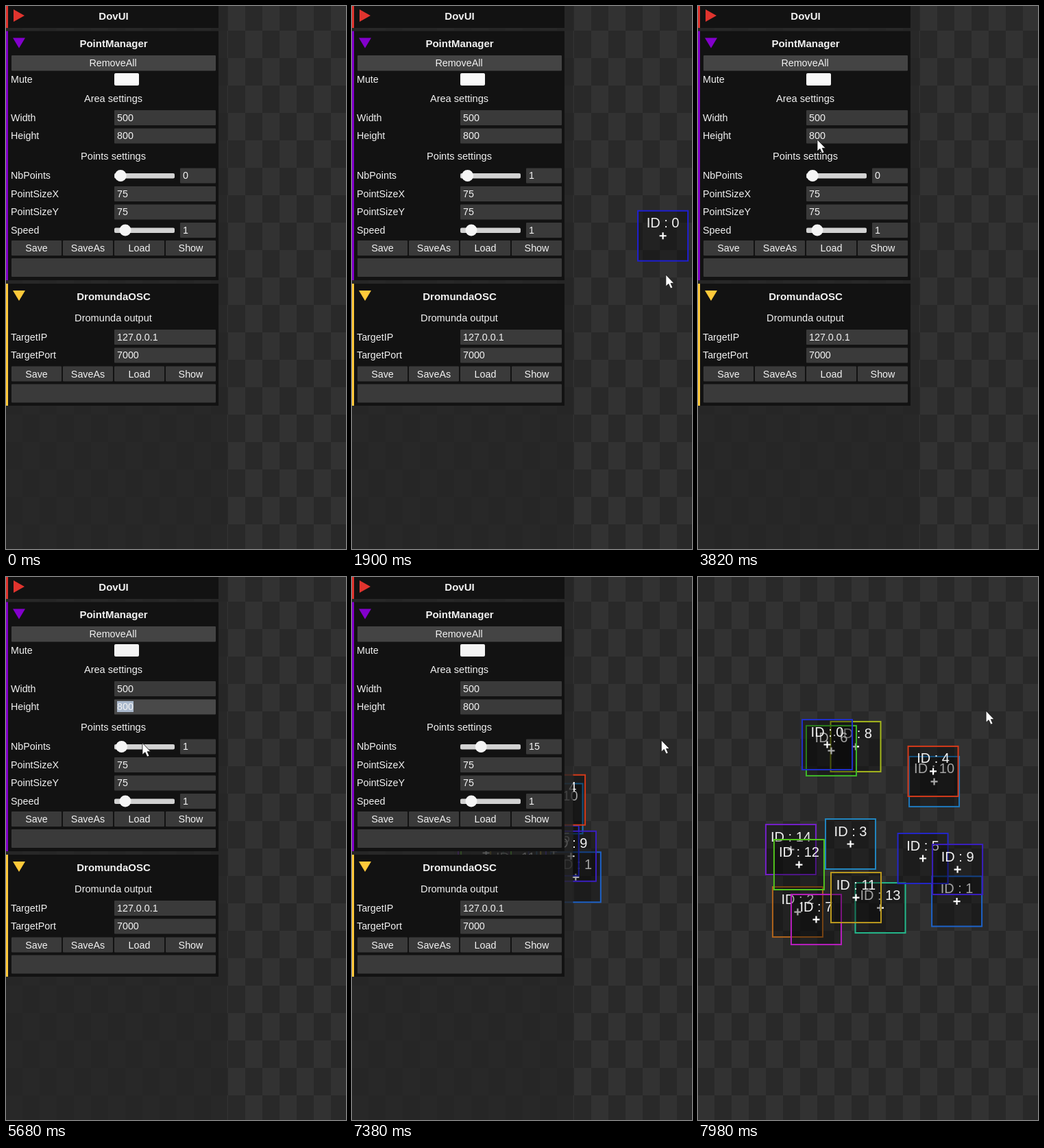
An HTML page that plays this animation: 496 px wide and 792 px high, repeating every 8000 ms.

```html
<!DOCTYPE html>
<html lang="en">
<head>
<meta charset="utf-8">
<title>Point panel</title>
<style>
html, body { margin: 0; width: 100%; height: 100%; overflow: hidden; background: #292929; }
svg { display: block; width: 496px; height: 792px; font-family: "Liberation Sans", Arial, sans-serif; }
text { fill: #f2f2f2; font-size: 14.3px; white-space: pre; }
</style>
</head>
<body>
<svg id="stage" viewBox="0 0 496 792" xmlns="http://www.w3.org/2000/svg"></svg>
<script>
const LOOP = 8000;
const NS = "http://www.w3.org/2000/svg";
const stage = document.getElementById("stage");

function add(parent, tag, attrs, content) {
  const el = document.createElementNS(NS, tag);
  for (const key in attrs) el.setAttribute(key, attrs[key]);
  if (content !== undefined) el.textContent = content;
  parent.appendChild(el);
  return el;
}
const rect = (p, x, y, width, height, fill, more) =>
  add(p, "rect", { x, y, width, height, fill, ...more });
const label = (p, x, y, str, more) => add(p, "text", { x, y, ...more }, str);
const centered = (p, x, y, str, more) => label(p, x, y, str, { "text-anchor": "middle", ...more });
const show = (el, on) => el.setAttribute("display", on ? "inline" : "none");
const move = (el, [x, y]) => el.setAttribute("transform", `translate(${x.toFixed(2)} ${y.toFixed(2)})`);

// Checkerboard
const board = add(stage, "g", { "shape-rendering": "crispEdges" });
rect(board, 0, 0, 496, 792, "#292929");
for (let row = 0; row < 20; row++)
  for (let col = 0; col < 20; col++)
    if ((row + col) % 2) rect(board, col * 25 - 1, row * 40 - 4, 25, 40, "#323232");

// Tracked points
const pointLayer = add(stage, "g", {});
function makePoint(id, color) {
  const g = add(pointLayer, "g", { display: "none" });
  rect(g, -36.5, -36.5, 73, 73, "#000", { "fill-opacity": .33, stroke: color, "stroke-width": 2 });
  centered(g, 0, -12, "ID : " + id, { style: "font-size:20px" });
  add(g, "path", { d: "M-5 0H5M0-5V5", stroke: "#fff", "stroke-width": 2.2 });
  return g;
}

// id, final x, final y, colour; listed from back to front
const swarm = [
  [14, 135.5, 397.5, "#7420c8"], [2, 145.5, 488.5, "#b0641c"],
  [10, 344.5, 298.5, "#1e78bc"], [13, 266, 482.5, "#24b98c"],
  [8, 230, 247.5, "#a6b81c"], [6, 194.5, 253.5, "#3fb92a"],
  [1, 377.5, 473, "#1d62c8"], [5, 328, 410.5, "#2326c8"],
  [9, 378.5, 426.5, "#3a1fc0"], [3, 222.5, 389.5, "#2185bf"],
  [0, 188.5, 244.5, "#1f2fc8"], [4, 343, 283.5, "#d43a1a"],
  [7, 172.5, 499.5, "#b91fc0"], [11, 230.5, 467.5, "#bc9a1e"],
  [12, 147.5, 419.5, "#52c41e"]
].map(([id, x, y, color]) => ({
  x, y,
  born: id ? 6440 + 24 * id : 4500,
  from: id ? [248, 384] : [187, 190],
  el: makePoint(id, color)
}));
const dragged = makePoint(0, "#1f1fd0");

// Control panel
const panel = add(stage, "g", {});
rect(panel, 0, 0, 322.5, 792, "#262626", { "fill-opacity": .78 });

const FIELD = "#3a3a3a";
const field = (x, y, w, h = 22) => rect(panel, x, y, w, h, FIELD, { rx: 1 });

function section(y, h, color, title, open) {
  rect(panel, 0, y, 310, h, "#121212");
  rect(panel, 0, y, 3, h, color);
  const d = open ? `M10 ${y + 10}H28L19 ${y + 25}Z` : `M11 ${y + 5}L27 ${y + 14}L11 ${y + 23}Z`;
  add(panel, "path", { d, fill: color });
  centered(panel, 157, y + (open ? 23.5 : 20), title, { style: "font-size:15px;font-weight:bold" });
}
const heading = (y, str) => centered(panel, 156.5, y, str, { style: "font-size:14.6px" });

function inputRow(y, name, value) {
  label(panel, 7, y, name);
  const box = field(158, y - 15.5, 148);
  label(panel, 162, y, value);
  return box;
}
function sliderRow(y, name, value, cx) {
  label(panel, 7, y, name);
  rect(panel, 158, y - 8, 88, 7.5, "#d2d2d2", { rx: 2 });
  const knob = add(panel, "circle", { cx, cy: y - 4.5, r: 8.5, fill: "#f5f5f5" });
  field(254, y - 15.5, 52);
  return { knob, text: label(panel, 258, y, value) };
}
function fileButtons(y) {
  ["Save", "SaveAs", "Load", "Show"].forEach((name, i) => {
    field(8 + 75 * i, y, 73);
    centered(panel, 44.5 + 75 * i, y + 16, name);
  });
  field(8, y + 26, 298, 27);
}

section(0, 32, "#e0342e", "DovUI", false);

section(36.5, 363.5, "#8300cc", "PointManager", true);
rect(panel, 8, 72, 298, 22.5, "#444", { rx: 1 });
centered(panel, 156, 88, "RemoveAll");
label(panel, 7, 112, "Mute");
const mute = rect(panel, 158, 98, 36, 18, "#f9f9f9", { rx: 2 });
heading(140, "Area settings");
inputRow(167.5, "Width", "500");
const heightBox = inputRow(194, "Height", "800");
const selection = add(panel, "g", {});
rect(selection, 162, 181, 24, 16, "#a9b8cc");
label(selection, 162, 194, "800");
heading(224, "Points settings");
const count = sliderRow(252, "NbPoints", "0", 167);
inputRow(278.5, "PointSizeX", "75");
inputRow(305, "PointSizeY", "75");
sliderRow(331.5, "Speed", "1", 174);
fileButtons(342);

section(405, 178, "#ffc93a", "DromundaOSC", true);
heading(460, "Dromunda output");
inputRow(487.5, "TargetIP", "127.0.0.1");
inputRow(514, "TargetPort", "7000");
fileButtons(525.5);

const cursor = add(stage, "path", {
  d: "M0 0V17L4 13.5L7 20L10 18.8L7.2 12.5H12Z",
  fill: "#fff", stroke: "#111", "stroke-width": .8
});

// Pointer path: time, x, y
const path = [
  [650, 134, 735], [800, 300, 420], [920, 436, 84], [1060, 415, 250],
  [1240, 399, 278], [1330, 383, 287], [1420, 379, 288], [1480, 379, 288],
  [1680, 432, 275], [1880, 458, 380], [2080, 446, 490], [2190, 420, 510],
  [2320, 380, 500], [2450, 351, 452], [2540, 349, 404], [2680, 378, 290],
  [2780, 390, 277], [3350, 390, 277], [3820, 174, 195], [4150, 172, 104],
  [4190, 172, 104], [4500, 186, 187], [4720, 194, 230], [4970, 206, 191],
  [5110, 205, 193], [5450, 205, 193], [5680, 199, 242], [5880, 180, 265],
  [6140, 169, 246], [6350, 169, 246], [6800, 191, 248], [7100, 205, 246],
  [7380, 451, 238], [7500, 468, 230], [7860, 424, 200], [8000, 420, 195]
];

// Slope at a key; keys next to a pause are at rest
function slope(i, axis) {
  const a = path[i - 1], b = path[i], c = path[i + 1];
  if (!a || !c) return 0;
  const rest = (p, q) => p[1] === q[1] && p[2] === q[2];
  if (rest(a, b) || rest(b, c)) return 0;
  const left = (b[axis] - a[axis]) / (b[0] - a[0]);
  const right = (c[axis] - b[axis]) / (c[0] - b[0]);
  return left * right <= 0 ? 0 : 2 * left * right / (left + right);
}
function pointer(t) {
  if (t <= path[0][0]) return path[0].slice(1);
  let i = 0;
  while (i < path.length - 2 && t > path[i + 1][0]) i++;
  const a = path[i], b = path[i + 1], span = b[0] - a[0];
  const u = Math.min(1, (t - a[0]) / span), v = 1 - u;
  return [1, 2].map(k =>
    v * v * (1 + 2 * u) * a[k] + u * u * (3 - 2 * u) * b[k] +
    span * u * v * (v * slope(i, k) - u * slope(i + 1, k)));
}

function draw(t) {
  show(cursor, t >= 650);
  move(cursor, pointer(t));

  // The held point trails the pointer
  const held = t >= 1130 && t < 3190;
  show(dragged, held);
  move(dragged, pointer(t - 90));

  let total = held ? 1 : 0;
  for (const p of swarm) {
    const alive = t >= p.born;
    show(p.el, alive);
    if (!alive) continue;
    total++;
    const u = (t - p.born) / (7980 - p.born);
    move(p.el, [p.from[0] + (p.x - p.from[0]) * u, p.from[1] + (p.y - p.from[1]) * u]);
  }

  count.knob.setAttribute("cx", 167.2 + 1.4 * total);
  count.text.textContent = total;
  const focused = t >= 4500 && t < 6350;
  show(selection, focused);
  heightBox.setAttribute("fill", focused ? "#494949" : FIELD);
  mute.setAttribute("fill", t >= 4150 ? "#f4f4f4" : "#f9f9f9");
  show(panel, t < 7640);
}

const start = performance.now();
function tick() {
  draw((performance.now() - start) % LOOP);
  requestAnimationFrame(tick);
}
draw(0);
requestAnimationFrame(tick);
</script>
</body>
</html>
```
